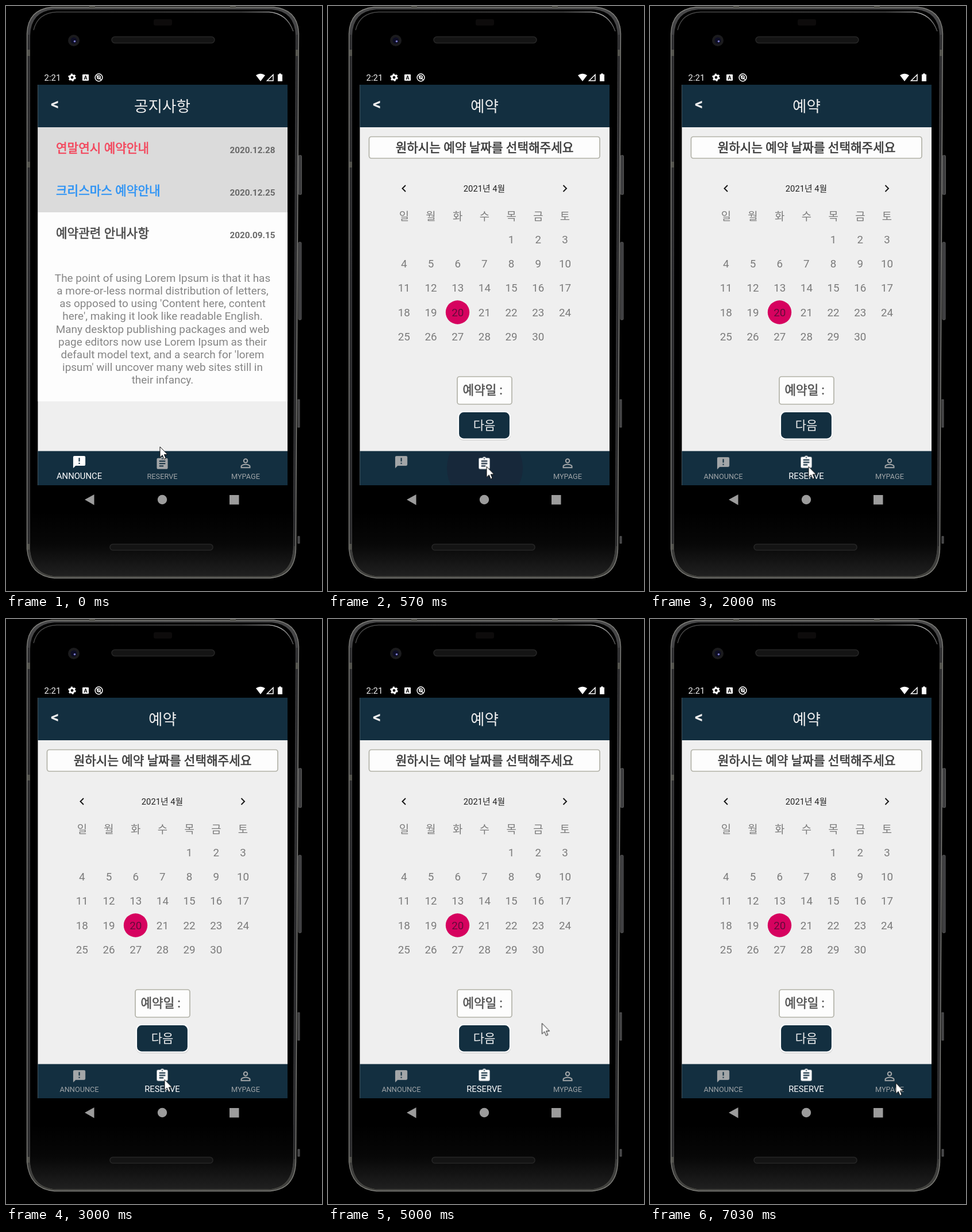
An HTML page for the animation above (8 s loop, 550 by 1018 pixels).

```html
<!DOCTYPE html>
<html lang="ko">
<head>
<meta charset="utf-8">
<title>예약</title>
<style>
html, body { margin: 0; width: 100%; height: 100%; overflow: hidden; background: #000; }
svg { display: block; width: 100%; height: 100%; }
text { font-family: Roboto, "Noto Sans CJK KR", "Noto Sans CJK", sans-serif; }
.mid { text-anchor: middle; }
.ko { font-size: 21.3px; stroke-width: .65; }
.title { font-size: 26.6px; fill: #eee; }
.date { font-size: 15.3px; font-weight: 700; fill: #696969; text-anchor: end; }
.body { font-size: 18.95px; fill: #858585; }
.cal { font-size: 18.8px; fill: #7b7b7b; }
.tab { font-size: 12.75px; fill: #9ea3a6; }
.tab.on { font-size: 14.8px; fill: #fff; }
.icon { fill: #a3a6a8; }
.icon.on { fill: #fff; }

.list, .book, .labels, .ripple, .cursor, .rise, .sink { animation: 8s linear infinite; }
.list { animation-name: list; }
.book { animation-name: book; }
.labels { animation-name: labels; }
.rise { animation-name: rise; }
.sink { animation-name: sink; }
.ripple { animation-name: ripple; transform-origin: 273px 804px; }
.cursor { animation-name: cursor; animation-timing-function: ease-in-out; }
@keyframes list { 0%, 6.74% { visibility: visible } 6.75%, 100% { visibility: hidden } }
@keyframes book { 0%, 6.74% { visibility: hidden } 6.75%, 100% { visibility: visible } }
@keyframes labels { 0%, 7.5% { opacity: 0 } 8.75%, 100% { opacity: 1 } }
@keyframes rise { 0%, 7.5% { transform: translateY(2px) } 8.75%, 100% { transform: none } }
@keyframes sink { 0%, 7.5% { transform: none } 8.75%, 100% { transform: translateY(2px) } }
@keyframes ripple {
  0%, 5.87% { opacity: 0; transform: scale(.3) }
  5.88% { opacity: .6; transform: scale(.3) }
  7.1%, 9% { opacity: 1; transform: scale(1) }
  12.8%, 100% { opacity: 0; transform: scale(1) }
}
@keyframes cursor {
  0%, .375% { transform: translate(268px, 767px) }
  3.375%, 49.125% { transform: translate(276px, 801.5px) }
  52.875% { transform: translate(372.5px, 703.5px) }
  70.375% { transform: translate(372.5px, 703.5px); animation-timing-function: ease-in }
  72.125% { transform: translate(383.5px, 803.5px); animation-timing-function: ease-out }
  75.875%, 100% { transform: translate(428px, 807.5px) }
}
</style>
</head>
<body>
<svg viewBox="0 0 550 1018">
  <defs>
    <linearGradient id="rim" x2="0" y2="1">
      <stop stop-color="#4a4a4b"/><stop offset=".08" stop-color="#3c3c3e"/>
      <stop offset=".9" stop-color="#38383a"/><stop offset="1" stop-color="#42423e"/>
    </linearGradient>
    <linearGradient id="chin" x2="0" y2="1">
      <stop stop-color="#000"/><stop offset=".5" stop-color="#070707"/><stop offset="1" stop-color="#202020"/>
    </linearGradient>
    <linearGradient id="shine">
      <stop stop-color="#444"/><stop offset=".8" stop-color="#555"/>
      <stop offset=".95" stop-color="#aaa"/><stop offset="1" stop-color="#555"/>
    </linearGradient>
    <clipPath id="bar"><path d="M55 776H490V833H55Z"/></clipPath>
    <path id="announce" d="M20 2H4c-1.1 0-2 .9-2 2V22l4-4h14c1.1 0 2-.9 2-2V4c0-1.1-.9-2-2-2zm-7 9h-2V5h2v6zm0 4h-2v-2h2v2z" transform="translate(114.8 781) scale(1.06)"/>
    <path id="reserve" d="M19 3h-4.2C14.4 1.8 13.3 1 12 1s-2.4.8-2.8 2H5c-1.1 0-2 .9-2 2v14c0 1.1.9 2 2 2h14c1.1 0 2-.9 2-2V5c0-1.1-.9-2-2-2zm-7 0a1 1 0 010 2 1 1 0 010-2zm2 14H7v-2h7v2zm3-4H7v-2h10v2zm0-4H7V7h10v2z" transform="translate(259.3 781.5) scale(1.06)"/>
  </defs>

  <!-- phone -->
  <rect width="550" height="1018"/>
  <g fill="#3d3d3f" stroke="#6a6a6a" stroke-width=".8">
    <rect x="509" y="260" width="5.5" height="68" rx="1.5"/>
    <rect x="509" y="411" width="5" height="135" rx="1.5"/>
    <rect x="508" y="685" width="3" height="48"/>
    <rect x="508" y="923" width="3" height="12"/>
  </g>
  <path d="M36.500 48Q38 6 80 2H466Q508 6 509.500 48L504.500 945Q503 992 460 995.500H84Q41 992 36.500 945Z" fill="url(#rim)" stroke="#80807c" stroke-width="1.300"/>
  <path d="M42 52Q43 9 84 6H462Q503 9 504 52L499.500 942Q498 989 457 992H87Q44 989 42 942Z"/>
  <path d="M42 880H500L499.500 942Q498 989 457 992H87Q44 989 42 942Z" fill="url(#chin)"/>
  <path d="M48 42Q55 12 88 10.500H458Q489 13 500 44" fill="none" stroke="url(#shine)" stroke-width="1.500"/>
  <path d="M39.500 50V940M506.500 50L502 940" stroke="#222224" stroke-width="1.500"/>
  <path d="M37 76h5v11h-5zM504 76h5v11h-5zM37 271h5v10h-5zM37 936h4v10h-4zM145 0h10v4h-10zM390 0h10v4h-10z" fill="#55554f"/>
  <rect x="257" y="23" width="32" height="11" rx="3" fill="#0d0b0b"/>
  <g fill="#141414" stroke="#262626" stroke-width="1.5">
    <rect x="184" y="53.5" width="179" height="11" rx="5.5"/>
    <rect x="181" y="936.5" width="179" height="10.5" rx="5"/>
  </g>
  <circle cx="118" cy="60" r="10" fill="#1b1b1d"/>
  <circle cx="118" cy="60" r="5.5" fill="#0d0d24"/>
  <circle cx="119.5" cy="61.5" r="1.8" fill="#7a7ac8"/>

  <!-- status bar -->
  <text x="66.5" y="130" font-size="15" fill="#eee">2:21</text>
  <circle cx="115" cy="124.3" r="3.9" fill="none" stroke="#fff" stroke-width="3"/>
  <circle cx="115" cy="124.3" r="5.8" fill="none" stroke="#fff" stroke-width="2" stroke-dasharray="3 3.07"/>
  <rect x="133" y="119" width="11" height="11" rx="1" fill="#fff"/>
  <text class="mid" x="138.5" y="128" font-size="9" font-weight="700">A</text>
  <g fill="none" stroke="#fff" stroke-width="1.5">
    <circle cx="161.5" cy="124.5" r="6.4"/>
    <circle cx="161.5" cy="124" r="2.8"/>
    <path d="M158 121L166 129"/>
    <path d="M454.5 130H465V119.5Z"/>
  </g>
  <path d="M435 120.5Q443 115 451 120.5L443 131Z" fill="#fff"/>
  <path d="M473 119h2v-1.5h4v1.5h2v12h-8z" fill="#fff"/>

  <!-- screen -->
  <rect x="55.4" y="137" width="434.6" height="697" fill="#efefef"/>
  <path d="M55.4 137H490V211H55.4ZM55.4 774.6H490V834H55.4Z" fill="#132f40"/>
  <text x="78" y="180" font-size="28" font-weight="700" fill="#eee">&lt;</text>
  <g clip-path="url(#bar)"><circle class="ripple" cx="273" cy="804" r="66" fill="#17283a"/></g>
  <path class="icon" transform="translate(404.3 783) scale(1.06)" d="M12 5.9a2.1 2.1 0 010 4.2 2.1 2.1 0 010-4.2m0 9c3 0 6.1 1.5 6.1 2.1v1.1H5.9V17c0-.6 3.1-2.1 6.1-2.1M12 4a4 4 0 000 8 4 4 0 000-8zm0 9c-2.7 0-8 1.3-8 4v3h16v-3c0-2.7-5.3-4-8-4z"/>
  <text class="tab mid" x="417" y="823">MYPAGE</text>

  <g class="list">
    <text class="title mid" x="272" y="184">공지사항</text>
    <rect x="55.4" y="211" width="434.6" height="148" fill="#dbdbdb"/>
    <rect x="55.4" y="359" width="434.6" height="329" fill="#fdfdfd"/>
    <text class="ko" x="87" y="255" fill="#f3475d" stroke="#f3475d">연말연시 예약안내</text>
    <text class="ko" x="87" y="329" fill="#2f94f5" stroke="#2f94f5">크리스마스 예약안내</text>
    <text class="ko" x="87" y="403" fill="#4b4b4b" stroke="#4b4b4b">예약관련 안내사항</text>
    <text class="date" x="468.5" y="256">2020.12.28</text>
    <text class="date" x="468.5" y="330">2020.12.25</text>
    <text class="date" x="468.5" y="404">2020.09.15</text>
    <g id="body"></g>
    <use href="#announce" class="icon on"/>
    <use href="#reserve" class="icon" y="2"/>
    <text class="tab on mid" x="127.5" y="823">ANNOUNCE</text>
    <text class="tab mid" x="272" y="823">RESERVE</text>
  </g>

  <g class="book">
    <text class="title mid" x="272.5" y="184">예약</text>
    <rect x="71.5" y="227.5" width="401.5" height="37.5" rx="4" fill="#fdfdfd" stroke="#b2b2a8" stroke-width="1.7"/>
    <text class="ko mid" x="272.5" y="254" fill="#3c3c3c" stroke="#3c3c3c">원하시는 예약 날짜를 선택해주세요</text>
    <path d="M135 312L129.5 317.5 135 323M409.5 312L415 317.5 409.5 323" fill="none" stroke="#1a1a1a" stroke-width="2"/>
    <text class="mid" x="272" y="322.5" font-size="14.8" fill="#222">2021년 4월</text>
    <circle cx="225.5" cy="533" r="20.7" fill="#d6025f"/>
    <g id="cal"></g>
    <rect x="225" y="645" width="95" height="48" rx="4" fill="#fdfdfd" stroke="#b2b2a8" stroke-width="1.7"/>
    <text class="ko" x="234.5" y="676" fill="#555" stroke="#555">예약일 :</text>
    <rect x="226.5" y="709" width="91.500" height="47" rx="9" fill="#d4d4d4"/>
    <rect x="227" y="706" width="90" height="47.5" rx="9" fill="#132f40" stroke="#fff" stroke-width="2.2"/>
    <text class="mid" x="272" y="737" font-size="21" fill="#f2f2f2">다음</text>
    <g class="sink"><use href="#announce" class="icon"/></g>
    <g class="rise"><use href="#reserve" class="icon on"/></g>
    <g class="labels">
      <text class="tab mid" x="127.5" y="823">ANNOUNCE</text>
      <text class="tab on mid" x="272" y="823">RESERVE</text>
    </g>
  </g>

  <g fill="#9c9c9c">
    <path d="M137 859L153.5 850V868.5Z"/>
    <circle cx="272" cy="859" r="8.2"/>
    <rect x="389" y="851" width="16.5" height="16.5"/>
  </g>
  <path class="cursor" d="M0 0V18.5L4.3 14.6 7.2 21.5 10.2 20.2 7.3 13.5H13Z" fill="#fff" stroke="#111"/>
</svg>
<script>
const addText = (id, cls, x, y, str, fill) => {
  const el = document.createElementNS('http://www.w3.org/2000/svg', 'text');
  el.setAttribute('class', cls + ' mid');
  el.setAttribute('x', x);
  el.setAttribute('y', y);
  if (fill) el.style.fill = fill;
  el.textContent = str;
  document.getElementById(id).append(el);
};

[
  'The point of using Lorem Ipsum is that it has',
  'a more-or-less normal distribution of letters,',
  "as opposed to using 'Content here, content",
  "here', making it look like readable English.",
  'Many desktop publishing packages and web',
  'page editors now use Lorem Ipsum as their',
  "default model text, and a search for 'lorem",
  "ipsum' will uncover many web sites still in",
  'their infancy.'
].forEach((line, i) => addText('body', 'body', 272.5, 480 + i * 22.15, line));

const colX = c => 132.3 + c * 46.7;
[...'일월화수목금토'].forEach((d, c) => addText('cal', 'cal', colX(c), 372.5, d));
for (let day = 1; day <= 30; day++) {
  const cell = day + 3; // the month starts on Thursday
  addText('cal', 'cal', colX(cell % 7), 413 + Math.floor(cell / 7) * 42.2, day, day === 20 && '#650a3a');
}
</script>
</body>
</html>
```
